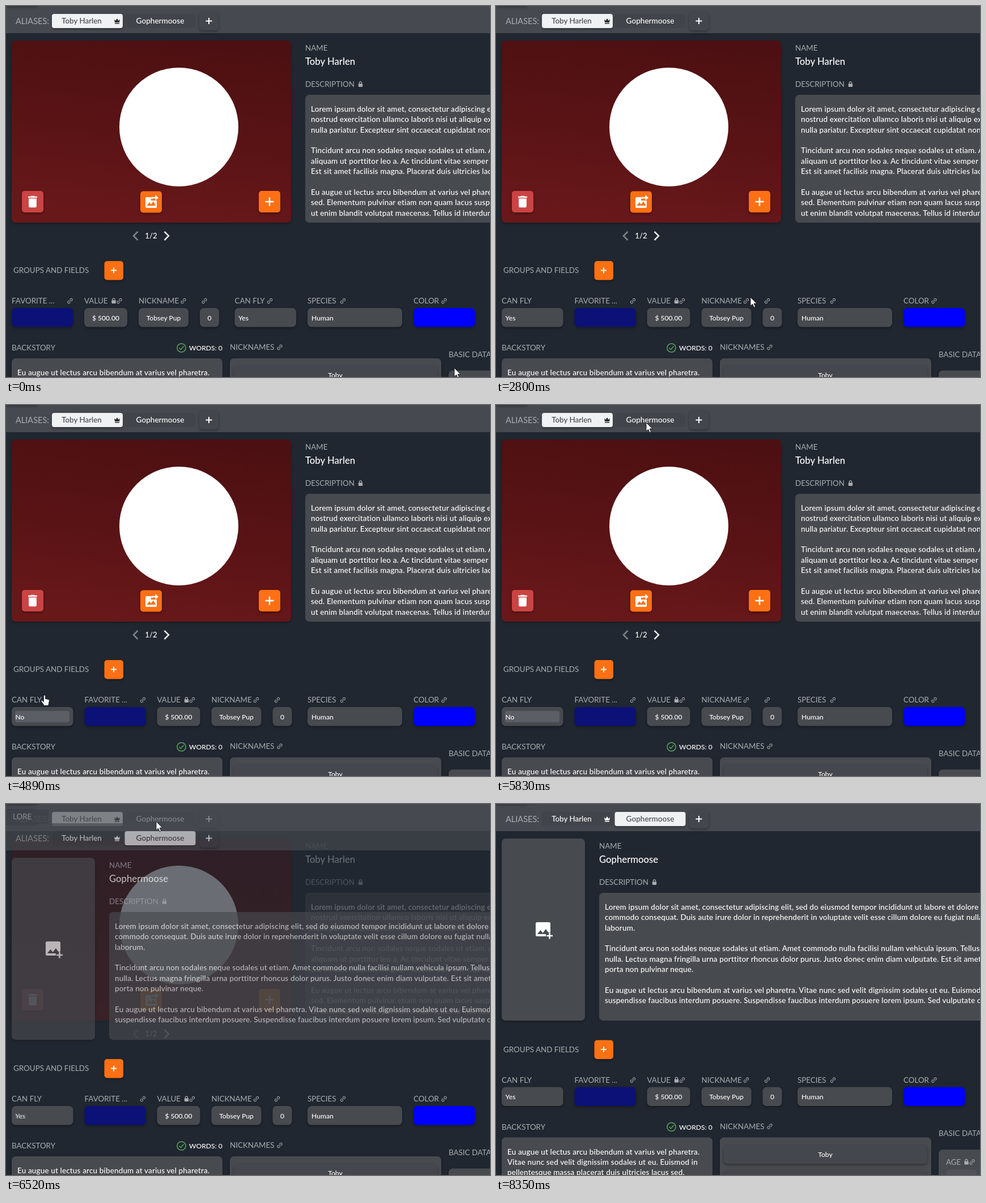
Animation, 854 px wide and 656 px high, one loop 9.21 s. Source, as an HTML page:

```html
<!DOCTYPE html>
<html lang="en">
<head>
<meta charset="utf-8">
<style>
  html, body { margin: 0; width: 100%; height: 100%; overflow: hidden; background: #212730; }
  svg { display: block; width: 854px; height: 656px; }
  text { font-family: Lato, "Open Sans", sans-serif; font-weight: 500; white-space: pre; }
  .label { font-weight: 400; }
  .body { letter-spacing: .15px; }
  .menu { letter-spacing: .9px; }
  .shadow { filter: drop-shadow(0 2px 2px #0005); }
  .pop { filter: drop-shadow(0 3px 5px #0008); }
</style>
</head>
<body>
<svg id="stage" viewBox="0 0 854 656"></svg>
<script>
const LOOP = 9210, PANEL = '#474a4f', GREY = '#a9acb1', ORANGE = '#fe7014', WHITE = '#fff';
const HERO = 'Toby Harlen', ALIAS = 'Gophermoose';
const stage = document.getElementById('stage');

const rect = (x, y, w, h, r, fill, cls = '') =>
  `<rect x="${x}" y="${y}" width="${w}" height="${h}" rx="${r}" fill="${fill}" class="${cls}"/>`;
const text = (x, y, s, size = 12.1, fill = WHITE, anchor = 'start', cls = '') =>
  `<text x="${x}" y="${y}" font-size="${size}" fill="${fill}" text-anchor="${anchor}" class="${cls}">${s}</text>`;
const label = (x, y, s) => text(x, y, s, 13.4, GREY, 'start', 'label');
const line = (d, color, w) => `<path d="${d}" fill="none" stroke="${color}" stroke-width="${w}"/>`;
const shape = (d, fill) => `<path d="${d}" fill="${fill}"/>`;
const at = (x, y, s, more = '') => `<g transform="translate(${x} ${y})${more}">${s}</g>`;
const group = (id, s) => `<g id="${id}">${s}</g>`;
const plus = (x, y, r, w = 2) => line(`M${x - r} ${y}h${2 * r}M${x} ${y - r}v${2 * r}`, WHITE, w);
const link = (x, y) => at(x, y, line('M-1 -2H-3a2 2 0 0 0 0 4H-1M1 -2H3a2 2 0 0 1 0 4H1M-2 0H2', GREY, 1.1), ' rotate(-45)');
const lock = (x, y) => rect(x - 3.7, y - 1.2, 7.4, 5.8, 1, GREY) +
  line(`M${x - 2.1} ${y - 1}v-1.5a2.1 2.1 0 0 1 4.2 0v1.5`, GREY, 1.2);
const crown = (x, y, fill) => shape(`M${x - 5} ${y - 3.5}l2.5 2.5 2.5 -4 2.5 4 2.5 -2.5 -1 5.5h-8zM${x - 4} ${y + 3}h8v1.5h-8z`, fill);
const button = (x, y, fill, size = 38) => rect(x, y, size, size, 5, fill, 'shadow');
const lines = (x, y, rows) =>
  rows.map((s, i) => s && text(x, y + i * 18.35, s, 13.5, WHITE, 'start', 'body')).join('');

function tabs(active) {
  const tab = (x, on) => on ? rect(x, 14, 125, 25, 4, '#f0f1f2', 'shadow') : rect(x, 14, 125, 25, 4, '#41454b');
  const ink = on => on ? '#43474d' : WHITE;
  return text(17, 31.5, 'ALIASES:', 14.5, GREY, 'start', 'label') + tab(81, !active) + tab(209.5, active) +
    text(133.5, 31, HERO, 13.4, ink(!active), 'middle') + crown(196, 27, !active ? '#25292f' : WHITE) +
    text(272, 31, ALIAS, 13.6, ink(active), 'middle') +
    rect(341, 10, 34, 33, 5, '#43474d', 'shadow') + plus(358, 26.5, 5.5);
}

function about(x, name, rows) {
  return label(x, 79, 'NAME') + text(x, 103.5, name, 16.7) +
    label(x, 143, 'DESCRIPTION') + lock(x + 97.5, 138.5) +
    rect(x, 157, 900, 226, 7, PANEL) + lines(x + 10, 187, rows);
}

const bar = rect(0, 0, 854, 48, 0, '#464a50') + rect(0, -25, 56, 25, 4, '#33373d', 'shadow');

const first = tabs(false) +
  rect(10, 61, 493, 322, 7, 'url(#red)', 'shadow') +
  '<circle cx="305" cy="214" r="105" fill="#fff"/>' +
  button(28, 327, '#ca4443') + button(237, 327.5, ORANGE) + button(446, 327, ORANGE) +
  at(33.2, 332.2, shape('M6 19a2 2 0 0 0 2 2h8a2 2 0 0 0 2-2V7H6zM19 4h-3.5l-1-1h-5l-1 1H5v2h14z', WHITE), ' scale(1.15)') +
  rect(246, 338, 20, 19, 2, WHITE) + shape('M248.5 353l4.5 -6 3 4 4 -5.5 4.5 7.5z', ORANGE) +
  rect(256, 334, 13, 10, 0, ORANGE) + line('M257.5 341v-2h7', WHITE, 2.4) + shape('M263.5 334l5.5 5 -5.5 5z', WHITE) +
  plus(465, 346, 7.5, 2.6) +
  line('M232.5 399l-7.5 7.5 7.5 7.5', '#7f838a', 2.5) + line('M279.5 399l7.5 7.5 -7.5 7.5', '#e6e7e8', 2.5) +
  text(256, 411, '1/2', 13.2, WHITE, 'middle') +
  about(528, HERO, [
    'Lorem ipsum dolor sit amet, consectetur adipiscing elit,',
    'nostrud exercitation ullamco laboris nisi ut aliquip ex ea',
    'nulla pariatur. Excepteur sint occaecat cupidatat non proident', '',
    'Tincidunt arcu non sodales neque sodales ut etiam. Amet',
    'aliquam ut porttitor leo a. Ac tincidunt vitae semper quis',
    'Est sit amet facilisis magna. Placerat duis ultricies lacus', '',
    'Eu augue ut lectus arcu bibendum at varius vel pharetra.',
    'sed. Elementum pulvinar etiam non quam lacus suspendisse',
    'ut enim blandit volutpat maecenas. Tellus id interdum velit']);

const second = bar + rect(0, -24, 75, 25, 4, '#3d4147') +
  text(12, -7.5, 'LORE', 13.4, GREY, 'start', 'label') + tabs(true) +
  rect(10, 61, 147, 322, 7, PANEL, 'shadow') +
  rect(70, 209, 26, 25, 2.5, WHITE) + shape('M73 230l5.5 -7 4 5 5.5 -7 6 9z', PANEL) +
  rect(88, 227, 13, 13, 0, PANEL) + plus(94.5, 233, 5.5, 2.6) +
  about(182, ALIAS, [
    'Lorem ipsum dolor sit amet, consectetur adipiscing elit, sed do eiusmod tempor incididunt ut labore et dolore magna',
    'commodo consequat. Duis aute irure dolor in reprehenderit in voluptate velit esse cillum dolore eu fugiat nulla pariatur',
    'laborum.', '',
    'Tincidunt arcu non sodales neque sodales ut etiam. Amet commodo nulla facilisi nullam vehicula ipsum. Tellus id',
    'nulla. Lectus magna fringilla urna porttitor rhoncus dolor purus. Justo donec enim diam vulputate. Est sit amet',
    'porta non pulvinar neque.', '',
    'Eu augue ut lectus arcu bibendum at varius vel pharetra. Vitae nunc sed velit dignissim sodales ut eu. Euismod in',
    'suspendisse faucibus interdum posuere. Suspendisse faucibus interdum posuere lorem ipsum. Sed vulputate odio']);

const box = (x, w, fill = PANEL) => rect(x, 534, w, 33.5, 7, fill, 'shadow');
const value = (x, s, anchor = 'middle') => text(x, 555.5, s, 12.1, WHITE, anchor);

const movable = label(10, 526, 'FAVORITE ...') + link(113, 521.5) + box(10, 108.5, '#0c1177') +
  label(138, 526, 'VALUE') + lock(190, 521.5) + link(200, 521.5) + box(138, 76) + value(176, '$ 500.00') +
  label(234, 526, 'NICKNAME') + link(313, 521.5) + box(234, 88) + value(278, 'Tobsey Pup') +
  link(350, 521.5) + box(342, 34) + value(359, '0');

const canFly = label(0, 526, 'CAN FLY') + group('flyLink', link(62, 521.5)) + box(0, 108.5) +
  group('focus', rect(6, 541, 96, 20, 3, '#5b5e64')) +
  group('yes', value(6.5, 'Yes', 'start')) + group('no', value(6.5, 'No', 'start'));

const fields = label(13, 472, 'GROUPS AND FIELDS') + button(173.5, 451, ORANGE, 33.5) + plus(190, 467.5, 5) +
  group('movable', movable) + group('canFly', canFly) +
  label(532, 526, 'SPECIES') + link(594.5, 521.5) + box(532, 167) + value(539, 'Human', 'start') +
  label(719, 526, 'COLOR') + link(773, 521.5) + box(719, 108.5, '#0000fe') +
  label(10, 609, 'BACKSTORY') +
  '<circle cx="309.5" cy="604.5" r="7.6" fill="none" stroke="#57a05f" stroke-width="1.5"/>' +
  line('M305.5 604.5l3 3 5 -6', '#57a05f', 1.5) + text(323, 609, 'WORDS: 0') +
  rect(10, 623, 372, 140, 7, PANEL, 'shadow') +
  lines(20, 653, ['Eu augue ut lectus arcu bibendum at varius vel pharetra.',
    'Vitae nunc sed velit dignissim sodales ut eu. Euismod in',
    'pellentesque massa placerat duis ultricies lacus sed.']) +
  label(395, 608, 'NICKNAMES') + link(483, 603.5) + rect(395, 623, 373, 140, 7, PANEL, 'shadow') +
  rect(402, 636, 359, 33.5, 6, '#44474d', 'shadow') + text(581, 657, 'Toby', 12.1, WHITE, 'middle') +
  rect(402, 683, 359, 33.5, 6, '#44474d', 'shadow') +
  label(781, 620.5, 'BASIC DATA') + rect(781, 644.5, 120, 140, 7, PANEL, 'shadow') +
  label(794, 671.5, 'AGE') + lock(830, 666.5) + link(840, 666.5) + rect(794, 680, 54, 34, 6, '#505359');

const menu = rect(440, 432, 220.5, 87, 7, '#3b3f45', 'pop') +
  group('hover', shape('M440 490h220.5v22a7 7 0 0 1 -7 7h-206.5a7 7 0 0 1 -7 -7z', ORANGE)) +
  ['Remove from ' + HERO, 'Add to a Group', 'Break Link Field Across Aliases']
    .map((s, i) => text(453.5, 450.5 + 29 * i, s, 12.3, WHITE, 'start', 'menu')).join('');

const list = rect(4, 484.5, 127.5, 92.5, 7, '#3c4046', 'pop') + rect(4, 531, 127.5, 40, 0, '#55585e') +
  text(16.5, 515.5, 'No') + text(16.5, 555.5, 'Yes');

const pointer = (id, d) => `<path id="${id}" d="${d}" fill="#fff" stroke="#15181c" stroke-width=".9" stroke-linejoin="round"/>`;

stage.innerHTML = `<defs><linearGradient id="red" x1=".6" y1="0" x2=".4" y2="1">
  <stop offset="0" stop-color="#4d1012"/><stop offset=".5" stop-color="#591315"/><stop offset="1" stop-color="#69181a"/>
  </linearGradient></defs>` +
  rect(0, 0, 854, 656, 0, '#212730') + bar +
  group('first', first) + group('second', second) + group('fields', fields) +
  group('menu', menu) + group('list', list) +
  group('cursor', pointer('arrow', 'M0 0V15.5l3.6 -3.4 2.5 5.7 2.5 -1.1 -2.5 -5.6H11z') +
    pointer('hand', 'M-1.6 1.6a1.6 1.6 0 0 1 3.2 0V6.5l5 1.1c1.4 .4 1.9 1.2 1.7 2.7l-.8 4.7 -1 3.5h-7.5l-1 -2.2 -4 -5.6c-.3 -1.3 1.3 -1.7 2.3 -.8l2.1 1.9z'));

const el = {};
stage.querySelectorAll('g[id], path[id]').forEach(n => el[n.id] = n);

// Cursor stops: time, x, y
const path = [
  [0, 791, 640], [610, 440, 519], [1330, 440, 519], [1410, 453, 518], [1640, 469, 513],
  [2730, 469, 513], [3270, 46, 554], [4060, 46, 554], [4120, 49, 557], [4200, 49, 557],
  [4500, 68, 513], [5050, 68, 513], [5830, 265, 31], [6620, 265, 31], [7120, 57, 489],
  [7280, 26, 505], [7670, 26, 505], [8350, 782, 660], [LOOP, 782, 660]];

const ramp = (t, a, b) => Math.min(1, Math.max(0, (t - a) / (b - a)));
const show = (node, v) => node.setAttribute('opacity', v);
const move = (node, x, y) => node.setAttribute('transform', `translate(${x} ${y})`);

function cursorAt(t) {
  const i = path.findIndex(p => p[0] > t);
  const [a, ax, ay] = path[i - 1], [b, bx, by] = path[i];
  const k = ramp(t, a, b), e = k * k * (3 - 2 * k);
  return [ax + (bx - ax) * e, ay + (by - ay) * e];
}

function draw(t) {
  const broken = t >= 1960, swapped = t >= 6590;
  const fade = swapped ? 1 : ramp(t, 6320, 6620);
  const picked = t >= 4670;

  show(el.first, 1 - fade);
  show(el.second, fade);
  move(el.second, 0, swapped ? 0 : 34);
  move(el.fields, 0, swapped ? -33.5 : 0);
  move(el.movable, broken ? 128.5 : 0, 0);
  move(el.canFly, broken ? 10 : 403.5, 0);
  show(el.flyLink, +!broken);
  show(el.focus, +(t >= 3900 && t < 6210));
  show(el.yes, picked ? fade : 1);
  show(el.no, picked ? 1 - fade : 0);

  show(el.menu, ramp(t, 800, 1010) * (1 - ramp(t, 1910, 2040)));
  show(el.hover, ramp(t, 1340, 1410));
  show(el.list, ramp(t, 3520, 3850) * (1 - ramp(t, 4620, 4880)));

  const hand = t >= 1340 && t < 2730 || t >= 4100 && t < 5050;
  show(el.hand, +hand);
  show(el.arrow, +!hand);
  move(el.cursor, ...cursorAt(t));
}

function tick() {
  draw(performance.now() % LOOP);
  requestAnimationFrame(tick);
}
tick();
</script>
</body>
</html>
```
